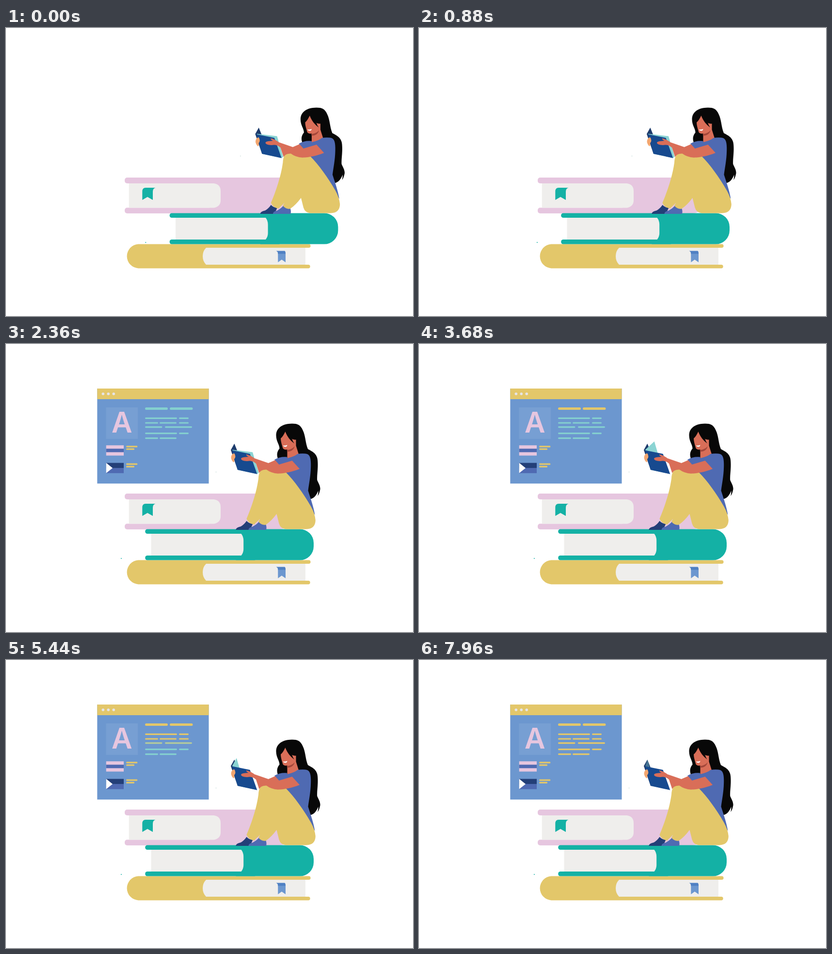
Animation, 840 px wide and 595 px high, one loop 8 s. Source, as an HTML page:

```html
<!DOCTYPE html>
<html lang="en">
<head>
<meta charset="utf-8">
<title>Reading on books</title>
<style>
  html, body { margin: 0; width: 100%; height: 100%; overflow: hidden; background: #fff; }
  svg { display: block; width: 100%; height: 100%; }
  .pink { fill: #e6c6df; } .paper { fill: #efeeec; } .teal { fill: #14b1a5; }
  .yellow { fill: #e3c76a; } .blue { fill: #4f6ab2; } .navy { fill: #233f78; }
  .sky { fill: #6c97cf; } .skin { fill: #d96e58; } .hair { fill: #080808; }
  #letter { font: 600 59px Inter, "Open Sans", sans-serif; text-anchor: middle; }
  .line { fill: none; stroke-linecap: round; }
</style>
</head>
<body>
<svg viewBox="0 0 840 595">
  <g id="window">
    <rect class="sky" x="188.3" y="92" width="230.2" height="196.3"/>
    <rect class="yellow" x="188.3" y="92" width="230.2" height="22"/>
    <g fill="#e6e5e8">
      <circle cx="200.3" cy="103" r="2.8"/><circle cx="211.2" cy="103" r="2.8"/><circle cx="222.2" cy="103" r="2.8"/>
    </g>
    <rect x="206.5" y="131" width="65.5" height="65" fill="#779fd3"/>
    <text id="letter" class="pink" x="239.2" y="183">A</text>
    <rect class="pink" x="206.7" y="209.3" width="36.3" height="21.2"/>
    <rect class="blue" x="206.7" y="216.3" width="36.3" height="7.2"/>
    <rect class="navy" x="206.7" y="245.6" width="36.3" height="11"/>
    <rect class="blue" x="206.7" y="256.3" width="36.3" height="10.5"/>
    <path fill="#fff" d="M206.7 245.6L220 256.3L206.7 266.8Z"/>
    <path class="line" stroke="#e3c76a" stroke-width="3.2"
      d="M249.6 211.9H269.8M249.6 217.2H263.5M249.6 248.1H269.8M249.6 253.4H263.5"/>
    <g id="rows"></g>
  </g>

  <g id="pinkBook">
    <rect class="pink" x="245" y="309" width="250" height="12" rx="5"/>
    <rect class="pink" x="245" y="371.3" width="250" height="11.7" rx="5"/>
    <path class="pink" d="M420 309H564A26 26 0 0 1 590 335V357A26 26 0 0 1 564 383H420Z"/>
    <path class="paper" d="M253.7 321H429Q443 323 443 337V356Q443 369 429 371.4H253.7Z"/>
    <path class="teal" d="M281.3 355.3V338Q281.3 330 288 330H308.5Q303 331.5 303 338V355.3L292 349Z"/>
  </g>
  <g id="yellowBook">
    <path class="yellow" d="M273 446.5H624.8a3.8 3.8 0 0 1 0 7.6H600V489H624a3.7 3.7 0 0 1 0 7.4H273a25 25 0 0 1 0-49.9Z"/>
    <path class="paper" d="M618 454.1V489H413Q406 482 406 471.5T413 454.1Z"/>
    <path class="sky" d="M561.3 464H577V484L569 478.5L561.3 484Z"/>
    <path fill="#4f80c3" d="M557.5 460.6H575Q577 461 577 466.5H561.3Q561.3 462 557.5 460.6Z"/>
  </g>

  <g id="reader">
    <circle class="teal" cx="288.4" cy="443" r="1"/>
    <circle cx="484" cy="264.5" r=".7" fill="#a9c9c4"/>
    <rect class="teal" x="337.7" y="382.5" width="230" height="9.6" rx="4.6"/>
    <rect class="teal" x="337.7" y="437" width="230" height="9.6" rx="4.6"/>
    <path class="teal" d="M525 382.5H657A28.5 28.5 0 0 1 685.5 411V418A28.5 28.5 0 0 1 657 446.6H525Z"/>
    <path class="paper" d="M350 392.1H536Q540.7 398 540.7 406V424Q540.7 431 536 437H350Z"/>

    <path class="hair" d="M640 164.6C620 165 608 174 608 189C608 201 615 208 615 216C609 223 609 230 612 238Q614 233 618 236L640 240L676 250L672 300L678 320.5C686 319 691 313 695 303Q695 308 693.8 314Q697.500 309 699 300C699.500 293 695 287 692.700 281C692 270 695 258 693.700 241C693 226 682 222 673.500 217C668 203 669 190 663 178C658 167 652 164.300 640 164.600Z"/>
    <path class="skin" d="M627 181C632 191 640 199 649 197.500V210L655 229L631 237V218C626 219 622 217 621.500 214C619.500 207 617.500 201 617.500 195C621 192 624 187 627 181Z"/>
    <path class="hair" d="M627 181C631 192 637 199 645.500 205.500Q642 201 641 196.500Z"/>
    <path fill="#a3473a" d="M630 219C637 219 643 215 646 211.500C645 218 639 222.500 631 222.500Z"/>
    <path fill="#fff" d="M622 209.500Q627 210.500 631 208.500Q630.500 212.300 627 212.500Q623.500 212.300 622 209.500Z"/>
    <path class="blue" d="M604.500 239Q616 232 631 233.500V236Q645 233 652.500 227Q660 225.800 668 226.500C677 227 679.500 234 679.700 247C680 270 676 287 674 303C679 319 685 335 688 353L627 266L612 250Z"/>

    <path class="navy" d="M524.800 384Q525 379 535 377Q542 373 547 365.500Q552 371 560 371.500L556 380L552 384Z"/>
    <path class="blue" d="M551 384Q551 379 560 377Q569 372 573.500 366Q580 373 586.500 372Q589 378 587.500 384Z"/>
    <path class="yellow" d="M585 257.500C575 259 572 267 571.500 278C568 305 557 338 547 361Q551 371 562.500 373L575 361L571.500 367Q578 375 586.500 373.500Q598 366 609 351L614 371Q617 381.500 628 382.500H670Q689 382 689.300 364Q688 350 680 336C664 308 645 282 628 265Q612 270 600 264Q592 258.500 585 257.500Z"/>

    <path d="M514.500 219L521.800 205.800L528 221L535 260H528.500Z" fill="#1d3b6c"/>
    <path id="page" fill="#8bd4d3"/>
    <path d="M517.200 219.500L554 227L568.800 268.700L528.600 260Z" fill="#174a8f"/>
    <path d="M517.500 228Q522 223.500 523.300 229.500Q525 234 521.500 238Q523 242 520 244.500Q515.500 240 515 235Q515 230.500 517.500 228Z" fill="#f3a66f"/>
    <path class="skin" d="M546.500 228C552 229 558 232 563 236L592 246L606 240L614 249L641 241L656.500 258C641 264 626 267.500 612 267.700Q598 267 588 259.500Q577 259 573 266.500L566.500 247C561 242 555 240.500 548 242C540 241.500 536 240 535.500 237C537 233.500 543 234 551 233Q546 231 546.500 228Z"/>
  </g>
</svg>

<script>
const LOOP = 8000;
const TEAL = [132, 208, 207], YELLOW = [227, 199, 106];
const $ = id => document.getElementById(id);
const progress = (t, start, length) => Math.min(1, Math.max(0, (t - start) / length));
const smooth = p => (1 - Math.cos(Math.PI * p)) / 2;
const mix = (a, b, p) => a + (b - a) * p;

// Each text row: y, stroke width, then [from, to] segments.
const rows = [
  [133.5, 5, [287, 334], [338, 385.5]],
  [153.3, 3.2, [287, 353], [357, 377]],
  [163, 3.2, [287, 314], [317, 352], [357, 377]],
  [171.6, 3.2, [287, 322.5], [328, 384]],
  [184.6, 3.2, [287, 353], [357, 377]],
  [194.6, 3.2, [287, 314], [317, 352]]
].map(([y, width, ...segments]) => {
  const path = document.createElementNS("http://www.w3.org/2000/svg", "path");
  path.setAttribute("class", "line");
  path.setAttribute("stroke-width", width);
  $("rows").append(path);
  return { path, y, width, segments };
});

function drawRow({ path, y, width, segments }, index, t) {
  const reach = mix(287, 386, smooth(progress(t, 1980 + index * 25, 240)));
  const d = segments.filter(([from]) => reach > from + width)
    .map(([from, to]) => `M${from + width / 2} ${y}H${Math.min(to, reach) - width / 2}`).join("");
  const p = smooth(progress(t, 3200 + index * 680, 400));
  path.setAttribute("d", d);
  path.setAttribute("stroke", `rgb(${TEAL.map((c, i) => Math.round(mix(c, YELLOW[i], p)))})`);
}

// The free corner follows a quadratic curve while the page turns about the spine.
function drawPage(t) {
  const FIRST = 2500, PERIOD = 805, TURN = 650;
  const turn = Math.min(5, Math.max(0, Math.floor((t - FIRST) / PERIOD)));
  const fade = progress(t, 7560, 480);
  const u = 0.95 * smooth(progress(t, FIRST + turn * PERIOD, TURN)) + 0.05 * fade;
  const curve = (a, b, c) => mix(mix(a, b, u), mix(b, c, u), u);
  const x = curve(559.5, 538.5, 521.8), y = curve(223.5, 190, 206);
  $("page").setAttribute("d", `M517.5 218.5L${x} ${y}L${x + 12.5} ${y + 42.5}L569 268.5L529 260Z`);
  $("page").setAttribute("opacity", 1 - 0.75 * fade);
}

function draw(t) {
  const slide = -50.5 * (1 - (1 - progress(t, 0, 1732)) ** 3);
  $("reader").setAttribute("transform", `translate(${slide} 0)`);
  const scale = smooth(progress(t, 1300, 820));
  $("window").setAttribute("transform", `translate(436 333) scale(${scale}) translate(-436 -333)`);
  rows.forEach((row, i) => drawRow(row, i, t));
  drawPage(t);
}

const began = performance.now();
function tick() {
  draw((performance.now() - began) % LOOP);
  requestAnimationFrame(tick);
}
draw(0);
requestAnimationFrame(tick);
</script>
</body>
</html>
```
